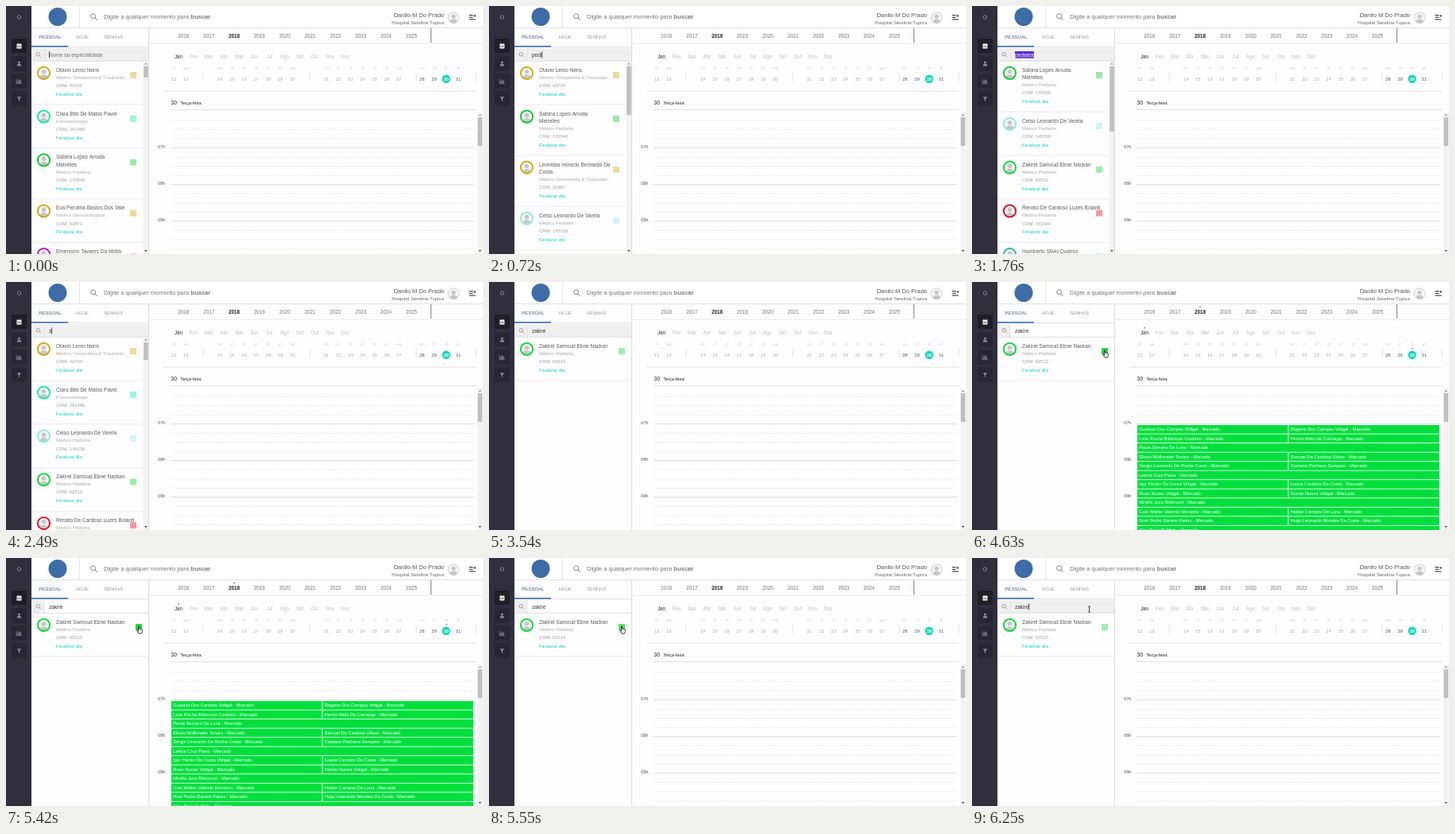
These frames come from a looping animation (600x312 px, 6580 ms). An HTML page with a canvas:

```html
<!DOCTYPE html>
<html lang="pt-BR">
<head>
<meta charset="utf-8">
<title>Agenda</title>
<style>
html, body { margin: 0; width: 100%; height: 100%; overflow: hidden; background: #fff; }
canvas { display: block; width: 100%; height: 100%; }
</style>
</head>
<body>
<canvas id="stage"></canvas>
<script>
const W = 600, H = 312, LOOP = 6580;
const canvas = document.getElementById('stage');
const ctx = canvas.getContext('2d');
const dpr = window.devicePixelRatio || 1;
canvas.width = W * dpr;
canvas.height = H * dpr;
ctx.scale(dpr, dpr);

const TEAL = '#14d3bb', GREEN = '#02df3d', GOLD = '#d0ad1c';

// name lines, specialty, registration, ring colour
const people = {
  otavio: [['Otavio Lemo Neris'], 'Médico Ortopedista E Traumatol...', '43700', GOLD],
  clara: [['Clara Bito De Matos Pavel'], 'Fonoaudióloga', '291486', '#1de9a5'],
  sabina: [['Sabina Lopes Arruda', 'Meirelles'], 'Médico Pediatra', '170546', '#18c83c'],
  eva: [['Eva Perolina Bastos Dos Vale'], 'Médico Dermatologista', '93871', GOLD],
  emersson: [['Emersson Tavares Da Motta'], 'Médico Clínico', '61240', '#b815c6'],
  leonidas: [['Leonidas Horacio Bernardo Da', 'Costa'], 'Médico Ortopedista E Traumatol...', '32467', GOLD],
  celso: [['Celso Leonardo De Varela'], 'Médico Pediatra', '145239', '#8ff0d8'],
  zakirel: [['Zakirel Samoud Ebne Nackan'], 'Médico Pediatra', '82513', '#14d83c'],
  renato: [['Renato De Cardoso Luzes Bolanti'], 'Médico Pediatra', '151394', '#e01224'],
  humberto: [['Humberto Silvio Queiroz'], 'Médico Pediatra', '70418', '#2fb79d']
};

const queries = [
  [0, ''], [200, 'p'], [460, 'pe'], [520, 'ped'], [720, 'pedi'], [850, 'pedia'],
  [910, 'pediat'], [970, 'pediatr'], [1030, 'pediatra'],
  [2490, 'z'], [2890, 'za'], [2970, 'zak'], [3060, 'zaki'], [3140, 'zakire']
];

// start, thumb height (0 hides the scrollbar), people shown
const results = [
  [0, 14, 'otavio clara sabina eva emersson'],
  [460, 61, 'otavio sabina leonidas celso zakirel'],
  [850, 82, 'sabina celso zakirel renato humberto'],
  [2490, 22, 'otavio clara celso zakirel renato'],
  [2890, 0, 'celso zakirel'],
  [2970, 0, 'zakirel']
];

const bookings = [
  ['Gustavo Dos Campos Vidigal', 'Rogerio Dos Campos Vidigal'],
  ['Livia Rocha Bittencort Cordeiro', 'Hector Melo De Camargo'],
  ['Paula Serrano De Luna'],
  ['Eliseu Wolkmeier Tonaro', 'Samuel De Cardoso Ulisse'],
  ['Sergio Leonardo De Rocha Costa', 'Caetano Pacheco Sampaio'],
  ['Leticia Cruz Paiva'],
  ['Igor Hector Da Costa Vidigal', 'Luana Cordeiro Da Costa'],
  ['Ruan Nunes Vidigal', 'Dorian Nunes Vidigal'],
  ['Mirella Juca Bittencort'],
  ['Caio Walter Valentin Monteiro', 'Helder Campos De Luna'],
  ['Noel Pedro Barreto Farias', 'Hugo Leonardo Mendes Da Costa'],
  ['Alan Saya Di Melo']
];

const latest = (table, t) => table.filter(row => row[0] <= t).pop();
const between = (t, a, b) => t >= a && t < b;

function rect(x, y, w, h, color) {
  ctx.fillStyle = color;
  ctx.fillRect(x, y, w, h);
}

function text(str, x, y, size, color, align = 'left', weight = 400) {
  ctx.font = `${weight} ${size}px "Liberation Sans", Arial, sans-serif`;
  ctx.textAlign = align;
  ctx.fillStyle = color;
  ctx.fillText(str, x, y);
}

function line(points, color, width = 1, dash = []) {
  ctx.beginPath();
  points.forEach(([x, y]) => ctx.lineTo(x, y));
  ctx.strokeStyle = color;
  ctx.lineWidth = width;
  ctx.setLineDash(dash);
  ctx.stroke();
  ctx.setLineDash([]);
}

function shape(points, color) {
  ctx.beginPath();
  points.forEach(([x, y]) => ctx.lineTo(x, y));
  ctx.closePath();
  ctx.fillStyle = color;
  ctx.fill();
}

function disc(x, y, r, color) {
  ctx.beginPath();
  ctx.arc(x, y, r, 0, 7);
  ctx.fillStyle = color;
  ctx.fill();
}

function ring(x, y, r, color, width) {
  ctx.beginPath();
  ctx.arc(x, y, r, 0, 7);
  ctx.strokeStyle = color;
  ctx.lineWidth = width;
  ctx.stroke();
}

function lens(x, y, r, color) {
  ring(x, y, r, color, 0.9);
  line([[x + r * 0.7, y + r * 0.7], [x + r * 1.7, y + r * 1.7]], color, 0.9);
}

function avatar(x, y, r, color, width) {
  disc(x, y, r, '#f4f4f4');
  ctx.save();
  ctx.beginPath();
  ctx.arc(x, y, r, 0, 7);
  ctx.clip();
  disc(x, y - r * 0.22, r * 0.36, '#c6c6ca');
  ctx.beginPath();
  ctx.ellipse(x, y + r * 0.75, r * 0.66, r * 0.5, 0, 0, 7);
  ctx.fill();
  ctx.restore();
  ring(x, y, r, color, width);
}

function scrollbar(x, top, thumbTop, thumbH) {
  rect(x, top, 6.5, H - top, '#f2f2f2');
  rect(x + 0.5, thumbTop, 5.5, thumbH, '#bfbfbf');
  const m = x + 3.2;
  shape([[m - 1.7, top + 4], [m + 1.7, top + 4], [m, top + 2]], '#888');
  shape([[m - 1.7, 307], [m + 1.7, 307], [m, 309.2]], '#444');
}

function drawSidebar() {
  rect(0, 0, 32, H, '#302f3b');
  ring(16.5, 14, 2.2, '#9a99a5', 0.8);
  for (let i = 0; i < 4; i++) rect(7, 41 + i * 22.2, 19, 18, i ? '#272632' : '#1f1e29');
  // calendar
  rect(13.5, 47.8, 6, 5.7, '#fff');
  rect(14.2, 49.8, 4.6, 0.6, '#1f1e29');
  rect(14.2, 51.5, 4.6, 0.5, '#1f1e29');
  rect(14.5, 46.8, 0.9, 1.4, '#fff');
  rect(17.6, 46.8, 0.9, 1.4, '#fff');
  const grey = '#8f8e9a';
  disc(16.5, 71, 1.5, grey);
  shape([[13.7, 75.6], [14.6, 73], [18.4, 73], [19.3, 75.6]], grey);
  line([[13.2, 91.5], [13.2, 97.7], [20, 97.7]], grey, 0.7);
  [[14.3, 3], [16, 4.6], [17.8, 3.6]].forEach(([x, h]) => rect(x, 97 - h, 1.1, h, grey));
  shape([[13.8, 114.3], [19.2, 114.3], [17.2, 116.8], [17.2, 119.8], [15.8, 119], [15.8, 116.8]], grey);
}

function drawHeader() {
  rect(32, 0, W - 32, 27, '#fff');
  line([[32, 27.5], [W, 27.5]], '#e0e0e0');
  line([[92.5, 0], [92.5, 27]], '#e6e6e6');
  disc(65, 13.5, 11.5, '#3d6ca6');
  lens(109.7, 12.8, 3, '#777');
  text('Digite a qualquer momento para ', 123, 16.2, 7.5, '#777');
  text('buscar', 257.2, 16.2, 7.5, '#777', 'right', 700);
  text('Danilo M Do Prado', 551, 14.2, 7.5, '#555', 'right');
  text('Hospital Serelma Tupiva', 551, 23, 6.05, '#666', 'right');
  avatar(563, 14.8, 7, '#c8c8c8', 0.8);
  [11, 13.7, 16.4].forEach((y, i) => rect(582.5, y, i < 2 ? 5 : 8, 1.1, '#333'));
  rect(588.2, 11.9, 3, 0.9, '#333');
  rect(589.3, 10.8, 0.9, 3, '#333');
}

function drawSearch(t) {
  const query = latest(queries, t)[1];
  const focused = t < 4630 || t >= 6250;
  text('PESSOAL', 55.5, 41.2, 6.1, '#4d5a78', 'center');
  text('HOJE', 96, 41.2, 6, '#999', 'center');
  text('SENHAS', 135, 41.2, 5.9, '#999', 'center');
  line([[32, 51.5], [179, 51.5]], '#e2e2e2');
  rect(32, 50, 46, 1.6, '#3e6db8');

  rect(33, 53, 146, 16, '#efefef');
  if (!focused) rect(48, 53, 131, 16, '#fff');
  line([[33, 69.3], [179, 69.3]], '#d8d8d8', 0.8);
  line([[48.3, 53], [48.3, 69]], '#e0e0e0', 0.7);
  lens(40.2, 60.6, 2.2, '#999');

  const selected = between(t, 1760, 2490);
  if (selected) rect(54, 57, 23.8, 8.6, '#5428d4');
  text(query || 'Nome ou especialidade', 54, 63.5, 6.5, selected ? '#fff' : query ? '#333' : '#777');
  if (t < 1430 || between(t, 2490, 3540) || t >= 6250) {
    const w = query ? ctx.measureText(query).width : 0;
    rect(54 + w, 57.3, 0.8, 8, '#222');
  }
}

function drawPerson(person, top, squareX, strength) {
  const [names, job, number, color] = person;
  const shift = (names.length - 1) * 9.2;
  avatar(47.5, top + 14.3, 7.6, color, 2);
  names.forEach((n, i) => text(n, 63, top + 12.7 + i * 9.2, 6.52, '#5c5c5c'));
  text(job, 63, top + 21.7 + shift, 5.97, '#adadad');
  text('CRM: ' + number, 63, top + 32 + shift, 5.9, '#a2a2a2');
  text('Finalizar dia', 63, top + 42.8 + shift, 6.1, TEAL);
  ctx.globalAlpha = strength;
  rect(squareX, top + 13, 8, 8, color);
  ctx.globalAlpha = 1;
  const bottom = top + 54.8 + shift;
  line([[33, bottom - 0.8], [179, bottom - 0.8]], '#e6e6e6', 0.8);
  return bottom;
}

function drawList(t) {
  const [, thumb, keys] = latest(results, t);
  const strength = between(t, 4630, 5450) ? 0.95 : between(t, 4160, 5880) ? 0.72 : 0.42;
  let top = 70;
  for (const key of keys.split(' ')) top = drawPerson(people[key], top, thumb ? 156 : 163, strength);
  if (thumb) scrollbar(172.7, 69.5, 76, thumb);
  line([[179.5, 28], [179.5, H]], '#dcdcdc');
}

function drawDates() {
  for (let i = 0; i < 10; i++) {
    const now = i === 2;
    text(2016 + i, 223.3 + i * 31.85, 40.3, 6.3, now ? '#222' : '#777', 'center', now ? 700 : 400);
  }
  line([[180, 47.2], [W, 47.2]], '#e4e4e4', 0.8);
  line([[534.5, 28], [534.5, 46]], '#777', 0.9);

  'Jan Fev Mar Abr Mai Jun Jul Ago Set Out Nov Dez'.split(' ').forEach((m, i) =>
    text(m, 217 + i * 19.05, 66.4, 6.3, i ? '#c2c2c2' : '#333', 'center'));

  const week = ['DO', '2ª', '3ª', '4ª', '5ª', '6ª', 'SÁ'];
  const starts = [[12, 211], [14, 269], [21, 403], [28, 523.3]];
  for (let d = 12; d <= 31; d++) {
    const [first, x0] = latest(starts, d);
    const x = x0 + (d - first) * 15.2, today = d === 30;
    text(week[d % 7], x, 80.3, 4.3, '#c6c6c6', 'center');
    if (today) disc(x, 91.7, 5.2, TEAL);
    text(d, x, 93.8, 5.9, today ? '#fff' : d > 27 ? '#555' : '#aaa', 'center', today ? 700 : 400);
  }
  [248, 382, 516, 591].forEach(x => line([[x, 84], [x, 95]], '#d8d8d8', 0.8));
  line([[198, 107.2], [591, 107.2]], '#dedede', 0.9);
  text('30', 207.3, 124.2, 6.9, '#222');
  text('Terça-feira', 219.3, 123.9, 5.6, '#222');
}

function drawGrid() {
  line([[207, 130.6], [592, 130.6]], '#dedede', 0.9);
  for (let i = -3; i < 12; i++) {
    const y = 178.6 + i * 11.52, hour = i % 4 === 0;
    line([[207, y], [589, y]], hour ? '#d6d6d6' : '#e2e2e2', 0.8, hour ? [] : [1, 0.8]);
    if (hour) text(`0${7 + i / 4}h`, 191, y + 0.6, 5.7, '#555');
  }
  scrollbar(593, 134, 140, 36);
}

function drawBookings() {
  bookings.forEach((row, i) => {
    const y = 180 + i * 11.52;
    row.forEach((name, col) => {
      const x = 208 + col * 190.4;
      rect(x, y, row.length > 1 ? 189.4 : 380, 10.7, GREEN);
      text(name + ' - Marcado', x + 2.3, y + 7.1, 5.7, '#fff');
    });
  });
  [[287, 31], [217, 57.3], [554, 83.3]].forEach(([x, y]) =>
    shape([[x - 1.2, y + 1], [x, y - 0.6], [x + 1.2, y + 1]], '#444'));
}

function drawHand(x, y) {
  ctx.beginPath();
  [[0, 0], [1.2, 0], [1.3, 3], [4.6, 3.9], [5, 6.4], [4.1, 9], [0.5, 9], [-1.8, 5.6], [-1.2, 4.9], [0, 6]]
    .forEach(([dx, dy]) => ctx.lineTo(x + dx, y + dy));
  ctx.closePath();
  ctx.fillStyle = '#fff';
  ctx.fill();
  ctx.strokeStyle = '#222';
  ctx.lineWidth = 0.9;
  ctx.lineJoin = 'round';
  ctx.stroke();
}

function drawBeam(x, y) {
  line([[x, y - 3.5], [x, y + 3.5]], '#333', 0.9);
  [-3.5, 3.5].forEach(d => line([[x - 1.6, y + d], [x + 1.6, y + d]], '#333', 0.8));
}

function drawPointer(t) {
  if (t < 3740) return;
  // 0 rests on the search field, 1 on the coloured square
  let p = Math.min(Math.floor((t - 3740) / 70), 7) / 7;
  if (t >= 5880) p = 1 - Math.min(Math.floor((t - 5880) / 74) + 1, 6) / 6;
  p = p * p * (3 - 2 * p);
  const x = 147.5 + 19 * p, y = 64.5 + 21.5 * p;
  if (y < 70) drawBeam(x, y);
  else drawHand(x, y);
}

function draw(t) {
  rect(0, 0, W, H, '#fdfdfd');
  drawHeader();
  drawSearch(t);
  drawList(t);
  drawDates();
  drawGrid();
  if (between(t, 4630, 5450)) drawBookings();
  drawSidebar();
  drawPointer(t);
}

const start = performance.now();
function tick() {
  draw((performance.now() - start) % LOOP);
  requestAnimationFrame(tick);
}
tick();
</script>
</body>
</html>
```
